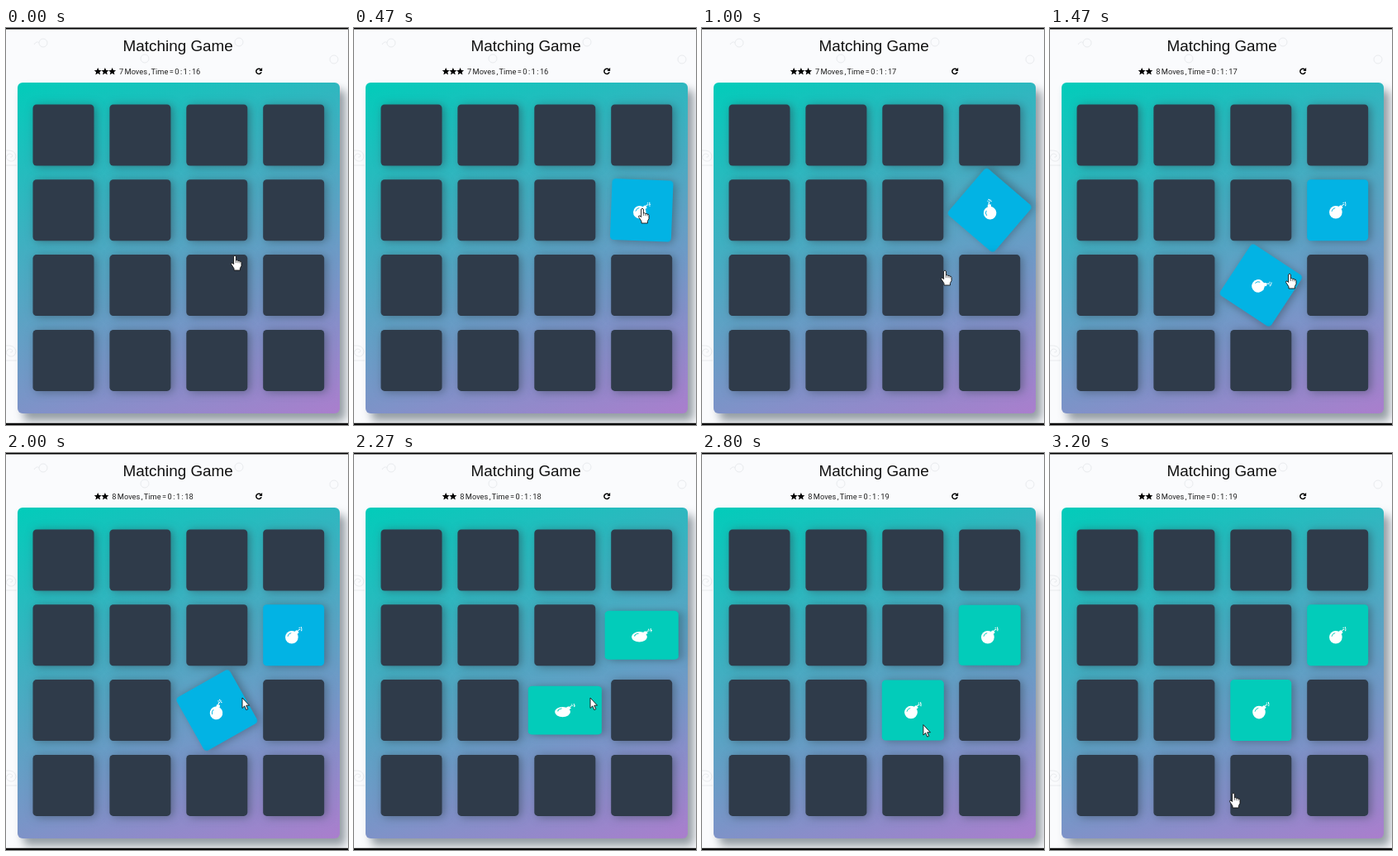
An HTML page for the animation above (3270 ms loop, 414 by 480 pixels).

```html
<!DOCTYPE html>
<html lang="en">
<head>
<meta charset="utf-8">
<title>Matching Game</title>
<style>
  html, body { margin: 0; width: 100%; height: 100%; overflow: hidden; background: #fafbfd; }
  svg { display: block; width: 414px; height: 480px; }
  .title { font: 18.9px "Liberation Sans", Arial, sans-serif; fill: #111; }
  .score { font: 9.3px Roboto, sans-serif; word-spacing: -.9px; fill: #222; }
  .doodle { fill: none; stroke: #e9ebee; stroke-width: 1; }
</style>
</head>
<body>
<svg viewBox="0 0 414 480">
  <defs>
    <linearGradient id="boardFill" gradientUnits="userSpaceOnUse" x1="121.9" y1="26.7" x2="296.1" y2="505.3">
      <stop offset="0" stop-color="#02ccba"/>
      <stop offset="1" stop-color="#aa7ecd"/>
    </linearGradient>
    <filter id="boardShadow" color-interpolation-filters="sRGB">
      <feDropShadow dx="7" dy="9" stdDeviation="5.5" flood-color="#2e3d49" flood-opacity=".5"/>
    </filter>
    <filter id="cardShadow" x="-.4" y="-.4" width="1.8" height="1.8" color-interpolation-filters="sRGB">
      <feDropShadow dx="3" dy="1.2" stdDeviation="5.5" flood-color="#2e3d49" flood-opacity=".5"/>
    </filter>
    <path id="star" d="M0-4.5 1.3-1.5 4.5-1.2 2.1.9 2.8 4.1 0 2.4-2.8 4.1-2.1.9-4.5-1.2-1.3-1.5Z"/>
  </defs>

  <rect width="414" height="480" fill="#fafbfd"/>
  <g class="doodle">
    <circle cx="45" cy="18" r="5"/>
    <path d="M34 20q3-5 6-2"/>
    <circle cx="168" cy="37" r="5"/>
    <circle cx="282" cy="17" r="5"/>
    <circle cx="397" cy="38" r="5"/>
    <path id="spiral" d="M0 148q11-1 12 7q-1 7-7 6q-6-2-4-7q4-4 7 0q0 3-3 2M0 166h13"/>
    <use href="#spiral" y="236"/>
  </g>

  <rect x="14" y="66" width="390" height="400" rx="6" fill="url(#boardFill)" filter="url(#boardShadow)"/>
  <path d="M0 0h414v1.6H0zM0 477.8h414v2.2H0z"/>

  <text class="title" x="141.5" y="28">Matching Game</text>
  <g id="stars"></g>
  <text class="score" id="score" y="56"></text>
  <g transform="translate(306 52.3)">
    <path d="M2.4-2.1A3.2 3.2 0 1 0 3.1 1" fill="none" stroke="#000" stroke-width="1.5"/>
    <path d="M4.1-4.2V-.4H.3Z"/>
  </g>

  <g id="cards"></g>

  <g id="hand" fill="#fff" stroke="#111" stroke-width=".9" stroke-linejoin="round">
    <path d="M-1.4 1Q0-1 1.4 1V6Q2.8 5 3.8 6.5Q5.2 5.7 6 7.2Q7.8 6.7 8 8.6V12.5L6.4 15.5V18H-1V15.8L-4.4 10.5Q-4.6 8.6-3 9L-1.4 10.6Z"/>
    <path d="M1.4 6V9M3.8 6.7V9.2M6 7.4V9.4" fill="none" stroke-width=".6"/>
  </g>
  <path id="arrow" d="M0 0V12.5L2.8 9.9 4.8 14.6 6.8 13.7 4.8 9.2H8.5Z"
        fill="#fff" stroke="#111" stroke-width=".9" stroke-linejoin="round"/>
</svg>

<script>
const LOOP = 3270, STEP = 200 / 3, CARD = 74;
const CLOSED = '#2f3b4a', OPEN = '#02b3e4', MATCHED = '#02ccba';
const SPIN_TIME = 960, MATCH_AT = 2113, MATCH_TIME = 1000;
const OPENED_AT = { 7: 454, 10: 1372 };
const MOVE_AT = OPENED_AT[10];
const TICK_AT = 800;
const $ = id => document.getElementById(id);
const lerp = (a, b, k) => a + (b - a) * k;
const clamp = k => Math.min(1, Math.max(0, k));
const smooth = k => k * k * (3 - 2 * k);

// cubic-bezier(.25, .1, .25, 1)
function ease(x) {
  const curve = (a, b, u) => 3 * a * u * (1 - u) ** 2 + 3 * b * u * u * (1 - u) + u ** 3;
  let low = 0, high = 1;
  for (let i = 0; i < 24; i++) {
    const mid = (low + high) / 2;
    if (curve(.25, .25, mid) < x) low = mid; else high = mid;
  }
  return curve(.1, 1, low);
}

// Interpolates rows of [time, a, b]
function track(rows, time, easing) {
  let i = 0;
  while (i < rows.length - 2 && time >= rows[i + 1][0]) i++;
  const [from, to] = [rows[i], rows[i + 1]];
  const k = easing(clamp((time - from[0]) / (to[0] - from[0])));
  return [lerp(from[1], to[1], k), lerp(from[2], to[2], k)];
}

const RUBBER_BAND = [
  [0, 1, 1], [.3, 1.25, .75], [.4, .75, 1.25], [.5, 1.15, .85],
  [.65, .95, 1.05], [.75, 1.05, .95], [1, 1, 1]
];
const POINTER = [
  [0, 277, 275], [70, 277, 275], [410, 349, 218], [570, 349, 218],
  [960, 294, 293], [1060, 294, 293], [1300, 290, 297], [1550, 290, 297],
  [1800, 286, 296], [2600, 286, 296], [3170, 222, 411], [LOOP, 222, 411]
];

const BOMB = `
  <circle cx="-2.3" cy="2.5" r="7.8" fill="#fff"/>
  <path d="M1.2-4.2 3.6-6.2 6.4-3.4 4.2-1.1Z" fill="#fff"/>
  <path d="M4.6-4.6Q6-7.4 8-6.7M6.5-9.3 7.4-8.4M9.2-10V-8.2M10.4-7.3H8.8M10-5.2 9-6" fill="none" stroke="#fff" stroke-width="1.1"/>
  <path class="glint" d="M-7.2 1.6Q-6.6-2-3-2.7" fill="none" stroke-width=".9"/>`;

const cards = Array.from({ length: 16 }, (_, i) => ({
  x: 69.5 + (i % 4) * 92.9,
  y: 129.5 + Math.floor(i / 4) * 90.8,
  openedAt: OPENED_AT[i] ?? Infinity
}));
$('cards').innerHTML = cards.map(() => `<g>
  <rect x="-37" y="-37" width="${CARD}" height="${CARD}" rx="4.5" filter="url(#cardShadow)"/>
  <g class="bomb">${BOMB}</g></g>`).join('');
cards.forEach((card, i) => {
  card.node = $('cards').children[i];
  card.face = card.node.querySelector('rect');
  card.bomb = card.node.querySelector('.bomb');
  card.glint = card.node.querySelector('.glint');
});

function drawCard(card, time) {
  const open = time >= card.openedAt;
  const matched = open && time >= MATCH_AT;
  const color = matched ? MATCHED : open ? OPEN : CLOSED;
  let pose = '';
  if (matched) {
    pose = `scale(${track(RUBBER_BAND, (time - MATCH_AT) / MATCH_TIME, ease)})`;
  } else if (open) {
    pose = `rotate(${360 * ease(clamp((time - card.openedAt) / SPIN_TIME))})`;
  }
  card.node.setAttribute('transform', `translate(${card.x} ${card.y}) ${pose}`);
  card.face.setAttribute('fill', color);
  card.glint.setAttribute('stroke', color);
  card.bomb.setAttribute('visibility', open ? 'visible' : 'hidden');
}

function drawScore(time) {
  const moved = time >= MOVE_AT;
  const stars = moved ? 2 : 3;
  const seconds = 16 + Math.floor((time - TICK_AT) / 1000) + 1;
  $('stars').innerHTML = Array.from({ length: stars },
    (_, i) => `<use href="#star" x="${111.2 + i * 8.7}" y="52.4"/>`).join('');
  $('score').setAttribute('x', 111 + stars * 8.7 - .2);
  $('score').textContent = `${moved ? 8 : 7} Moves , Time = 0 : 1 : ${seconds}`;
}

function drawPointer(time) {
  const [x, y] = track(POINTER, time, smooth);
  // Closed cards are clickable; the cursor reacts a little after a card opens
  const overCard = cards.some(card => time < card.openedAt + 120 &&
    Math.abs(x - card.x) < 40 && Math.abs(y - card.y) < 40);
  for (const [id, shown] of [['hand', overCard], ['arrow', !overCard]]) {
    $(id).setAttribute('transform', `translate(${x} ${y})`);
    $(id).setAttribute('visibility', shown ? 'visible' : 'hidden');
  }
}

function render(time) {
  cards.forEach(card => drawCard(card, time));
  drawScore(time);
  drawPointer(time);
}

const start = performance.now();
function tick() {
  const elapsed = (performance.now() - start) % LOOP;
  render(Math.min(48, Math.floor((elapsed + 4) / STEP)) * STEP);
  requestAnimationFrame(tick);
}
tick();
</script>
</body>
</html>
```
